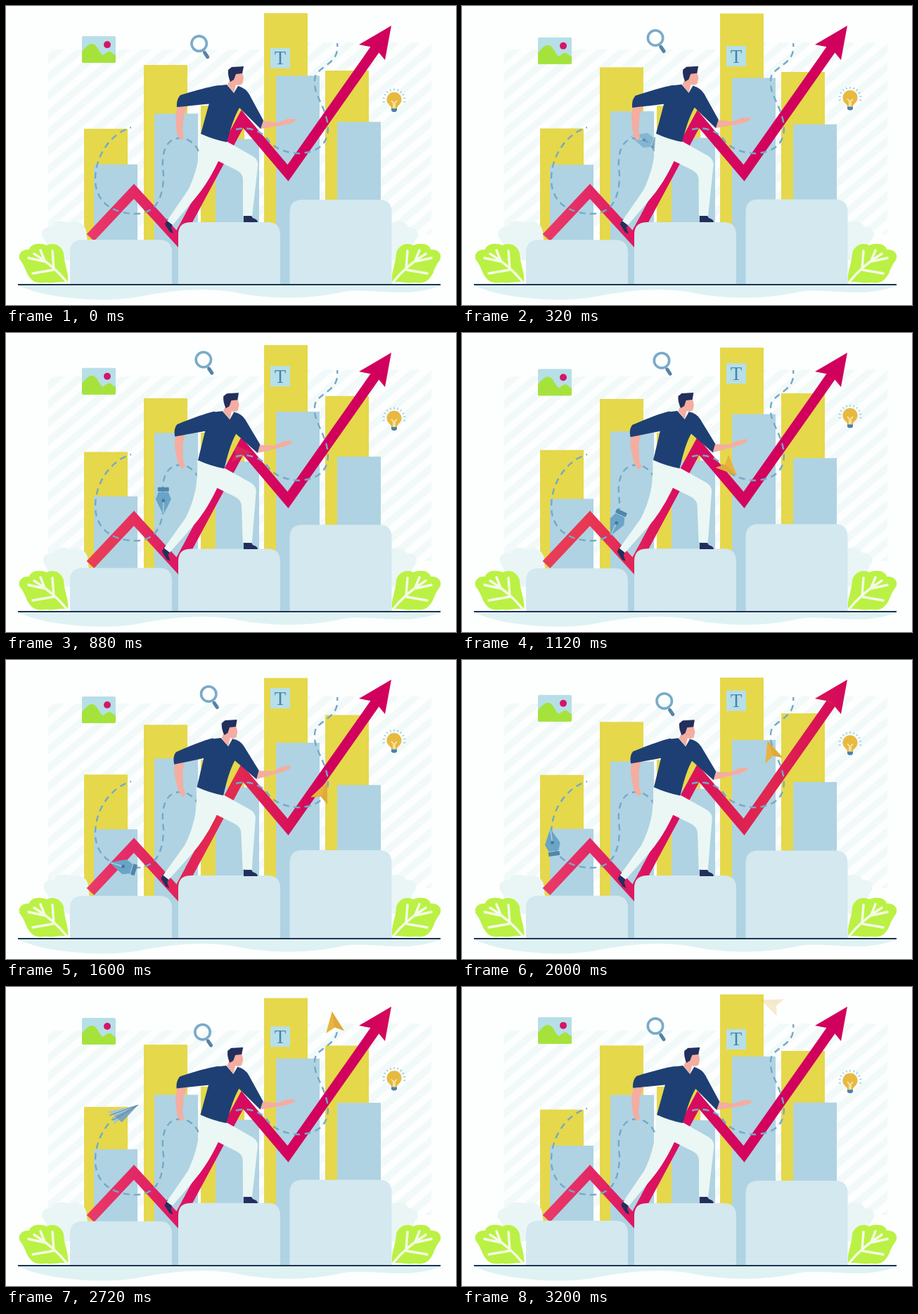
An HTML page for the animation above (3.28 s loop, 640x426 px).

```html
<!DOCTYPE html>
<html lang="en">
<head>
<meta charset="utf-8">
<title>Growth</title>
<style>
html, body { margin: 0; width: 100%; height: 100%; overflow: hidden; background: #fdfefe; }
svg { display: block; width: 640px; height: 426px; }
.dash { fill: none; stroke: #74a9c8; stroke-width: 2.4; stroke-dasharray: 9 6.5; }
.line { fill: none; }
.yellow { fill: #e5d84b; }
.blue { fill: #afd3e2; }
.podium { fill: #d3e8ef; }
.navy { fill: #1e3f73; }
.dark { fill: #222f5d; }
.skin { fill: #f4ada0; }
.cloth { fill: #ebf7f4; }
</style>
</head>
<body>
<svg viewBox="0 0 640 426">
  <defs>
    <linearGradient id="red" gradientUnits="userSpaceOnUse" x1="118" y1="0" x2="450" y2="0">
      <stop offset="0" stop-color="#e93b68"/>
      <stop offset=".45" stop-color="#dc1161"/>
      <stop offset="1" stop-color="#d1005d"/>
    </linearGradient>
    <linearGradient id="glow" gradientUnits="userSpaceOnUse" x1="-140" y1="0" x2="140" y2="0">
      <stop offset="0" stop-color="#ea4244" stop-opacity="0"/>
      <stop offset=".5" stop-color="#ea4244" stop-opacity=".6"/>
      <stop offset="1" stop-color="#ea4244" stop-opacity="0"/>
    </linearGradient>
    <clipPath id="area"><path d="M60 62H370V52H605V325H60Z"/></clipPath>
    <path id="blade" d="M88 395C90 380 83 370 82 352C79 340 66 336 58 341C46 336 34 340 33 347C22 346 16 354 20 362C26 370 27 374 30 381C36 392 42 396 56 394C70 396 80 390 88 395Z"/>
    <g id="plant">
      <use class="sway" href="#blade" fill="#eaf6f5" x="32" y="-32"/>
      <use href="#blade" fill="#bbf145"/>
      <path class="line" stroke="#f4fbe6" stroke-width="3.4" stroke-linecap="round" d="M87 394Q68 370 40 353M55 364L32 359M67 376L38 381M55 363L49 348M68 375L66 349"/>
    </g>
    <g id="trend">
      <path class="line" stroke-width="14.5" stroke-miterlimit="6" d="M120 330L182 264L244 332L336 161L401 238L526 60"/>
      <path stroke="none" d="M548 28L502 55L518 58L530 66L539 77Z"/>
    </g>
  </defs>

  <g id="stripes" clip-path="url(#area)" stroke="#f2f9f9" stroke-width="10"></g>
  <path fill="#dff2f3" d="M19 398C45 414 130 424 185 415C230 405 280 401 320 407C380 420 440 417 480 407C520 401 570 418 618 398Z"/>
  <g id="bars"></g>
  <use href="#plant"/>
  <use href="#plant" transform="translate(637) scale(-1 1)"/>
  <use href="#trend" fill="url(#red)" stroke="url(#red)"/>
  <use href="#trend" fill="url(#glow)" stroke="url(#glow)"/>
  <path class="dash" d="M274 207C270 198 260 188 248 188C230 188 219 205 224 240C224 272 214 296 185 296C150 296 127 278 127 247C127 212 150 181 178 173"/>
  <path class="dash" d="M327 176C345 171 363 178 372 190C380 203 400 210 418 210C445 208 462 195 457 165C452 138 434 122 440 100C447 84 475 82 471 53"/>
  <path id="leftWay" class="line" d="M274 207C270 198 260 188 248 188C230 188 219 205 224 240C224 272 214 296 185 296C150 296 127 278 127 247C127 212 150 181 178 173L220 153"/>
  <path id="rightWay" class="line" d="M327 176C345 171 363 178 372 190C380 203 400 210 418 210C445 208 462 195 457 165C452 138 434 122 440 100C447 84 475 82 471 53C471 40 464 29 452 24L432 17"/>

  <g id="flyer">
    <g id="nib">
      <rect x="-19" y="-8" width="6" height="16" rx="1" fill="#4f86ab"/>
      <path fill="#6aa4c6" d="M-12 -7L-2 -11Q9 -6 20 0Q9 6 -2 11L-12 7Z"/>
      <path class="line" stroke="#b9dae8" stroke-width="1.2" d="M2 0H18"/>
      <circle r="2.4" fill="#4479a2"/>
    </g>
    <g id="plane">
      <path fill="#a9c4d2" d="M23 0L-20 -9L-14 0L-20 11Z"/>
      <path fill="#7ba6bd" d="M23 0L-14 1L-8 13Z"/>
      <path class="line" stroke="#5488a6" d="M23 0L-20 -3M23 0L-17 5"/>
    </g>
  </g>
  <g id="cursor">
    <path fill="#e7b43f" d="M19 -4L-10 -18L-4 -4L-11 8Z"/>
    <path fill="#dfa93b" d="M19 -4L-4 -4L-11 8Z"/>
  </g>

  <g id="podiums" class="podium"></g>
  <path stroke="#1f3352" stroke-width="2" d="M17 397H618"/>

  <g id="man">
    <g id="backArm">
      <path class="skin" d="M244 141L258 142L253 156L251 178L253 188L248 191L243 182L241 158Z"/>
      <path class="navy" d="M304 113Q290 114 248 127Q242 133 243 144Q264 142 294 139Z"/>
    </g>
    <g id="backLeg">
      <path class="dark" d="M230 303L238 308L235 316L238 324L233 322L226 311Z"/>
      <path class="cloth" d="M276 186L311 200L302 221Q287 253 269 274L237 312L229 306L259 262Q270 240 274 215Z"/>
    </g>
    <path class="cloth" d="M276 182L314 193L351 214Q360 220 358 229L355 256L350 300L337 299L337 247Q337 239 328 234L302 221L276 205Z"/>
    <path class="navy" d="M297 114L314 112L324 124L330 114Q341 118 347 128L332 145Q323 160 314 194Q294 190 277 182L288 142Z"/>
    <g id="frontArm">
      <path class="skin" d="M361 163L386 166L400 161L411 161L411 165L399 169L362 175Z"/>
      <path class="navy" d="M330 114Q341 117 346 126L366 163L362 175L331 144Z"/>
    </g>
    <path class="skin" d="M318 106L325 95L336 94L338 103L336 111Q332 114 327 112L324 124L315 112Z"/>
    <path class="dark" d="M316 91L321 87L338 86L336 96L327 97L324 105L319 108Q315 99 316 91Z"/>
  </g>
  <path class="dark" d="M338 299H349L351 302Q358 304 358 308H338Z"/>

  <g id="picture">
    <rect x="108" y="43" width="48" height="38" rx="2" fill="#b7dfe8"/>
    <path fill="#a5e33c" d="M108 65C112 60 117 54 122 54C130 54 133 68 138 70C142 67 147 62 151 67Q154 70 156 70V79Q156 81 154 81H110Q108 81 108 79Z"/>
    <circle cx="144" cy="55" r="5" fill="#d31768"/>
  </g>
  <g id="lens">
    <path stroke="#79abc9" stroke-width="3" d="M5 9L9 14"/>
    <path stroke="#5683a6" stroke-width="5" stroke-linecap="round" d="M8 13L12 19"/>
    <circle r="10.7" class="line" stroke="#79abc9" stroke-width="3.6"/>
  </g>
  <g id="letter">
    <rect x="376" y="60" width="28" height="29" fill="#b7dfe9"/>
    <text x="390" y="83.5" text-anchor="middle" font-family="'Liberation Serif', serif" font-size="27" fill="#4583aa">T</text>
  </g>
  <g id="bulb">
    <path fill="#e8b93f" d="M548 146Q548 143 545 141A10.5 10.5 0 1 1 559 141Q556 143 556 146Z"/>
    <path class="line" stroke="#fff3cf" stroke-width="1.3" d="M551 146V138L548 135M553 146V138L556 135"/>
    <path fill="#4a83a8" d="M548 146H556V149L554 151H550L548 149Z"/>
    <g id="rays" stroke="#8fc6da" stroke-width="1.3"></g>
  </g>
</svg>
<script>
const LOOP = 3280, STEP = 80;
const $ = id => document.getElementById(id);
const set = (el, attrs) => { for (const k in attrs) el.setAttribute(k, attrs[k]); return el; };
const add = (parent, tag, attrs) =>
  parent.appendChild(set(document.createElementNS('http://www.w3.org/2000/svg', tag), attrs));
const ramp = (t, a, b) => Math.max(0, Math.min(1, (t - a) / (b - a)));

// One swing per loop around mid, highest value at time peak.
const swing = (t, mid, amp, peak) => mid + amp * Math.cos((t - peak) / LOOP * 2 * Math.PI);

const bar = (kind, x, ...top) => ({ top, el: add($('bars'), 'rect', { x, width: 62, class: kind }) });
const bars = [
  bar('yellow', 111, 169, 6, 100),   bar('blue', 125, 233.5, 8, 1750),
  bar('yellow', 196, 88, 6, 1200),   bar('blue', 211, 147, 7.5, 2990),
  bar('yellow', 277, 142, 0, 0),     bar('blue', 298, 185.5, 4.5, 3050),
  bar('yellow', 367, 18, 8, 1750),   bar('blue', 384, 108.5, 9.5, 1500),
  bar('yellow', 454, 85, 9, 350),    bar('blue', 471, 171.5, 7.5, 1350)
];

const podium = (x, ...top) => ({ x, top, el: add($('podiums'), 'path', {}) });
const podiums = [podium(91, 334.5, 1.5, 1650), podium(245, 307.5, .5, 0), podium(403.5, 273.5, 2.5, 0)];

for (let x = -240; x < 640; x += 31)
  add($('stripes'), 'path', { d: `M${x} 330L${x + 330} 50` });
for (let deg = -190; deg <= 10; deg += 20)
  add($('rays'), 'path', { d: 'M13.5 0H16.5', transform: `translate(552 134) rotate(${deg})` });

// Places el at distance s along the path, nose turned towards the way ahead.
function follow(el, path, s, opacity) {
  const at = d => path.getPointAtLength(Math.max(0, s + d));
  const p = at(0), a = at(-4), b = at(14);
  const deg = Math.atan2(b.y - a.y, b.x - a.x) * 180 / Math.PI;
  set(el, { transform: `translate(${p.x} ${p.y}) rotate(${deg})`, opacity });
}

function draw(t) {
  for (const { el, top } of bars) {
    const y = swing(t, ...top);
    set(el, { y, height: 396 - y });
  }
  for (const { el, x, top } of podiums)
    set(el, { d: `M${x} 396V${swing(t, ...top) + 18}q0 -18 18 -18h109q18 0 18 18V396Z` });

  const move = (id, x, y) => set($(id), { transform: `translate(${x} ${y})` });
  move('picture', 0, swing(t, 4.5, 4.7, 1450));
  move('letter', 0, swing(t, -10, 10, 3190));
  move('bulb', 0, swing(t, -9.3, 9.5, 3190));
  move('lens', swing(t, 281.5, 7, 1750), swing(t, 51.5, 13.5, 2540));

  // The man leans back with his front foot planted.
  const lean = swing(t, .5, .54, 1450);
  set($('man'), { transform: `translate(0 ${308 - lean}) skewX(${2.4 * lean}) translate(0 -308)` });
  set($('backArm'), { transform: `rotate(${-6 * lean} 298 118)` });
  set($('frontArm'), { transform: `translate(0 120) translate(322) skewY(${-6 * lean}) translate(-322 -120)` });
  set($('backLeg'), { transform: `translate(0 ${5 * lean}) rotate(${3 * lean} 290 200)` });
  for (const el of document.querySelectorAll('.sway')) set(el, { transform: `rotate(${3 * lean} 100 380)` });

  set($('glow'), { gradientTransform: `translate(${170 + (t - 1120) * .3})` });

  follow($('flyer'), $('leftWay'), 55 + .135 * (t - 560), ramp(t, 200, 400) * (1 - ramp(t, 2760, 3120)));
  const swap = ramp(t, 2440, 2680);
  set($('nib'), { opacity: 1 - swap });
  set($('plane'), { opacity: swap });

  const u = t - 1120;
  follow($('cursor'), $('rightWay'), 54 + u * (.2 - .000029 * u),
    ramp(t, 850, 1040) * (1 - .75 * ramp(t, 2800, 3200)));
}

const start = performance.now();
function tick() {
  const t = Math.max(0, performance.now() - start) % LOOP;
  draw(Math.floor(t / STEP) * STEP);
  requestAnimationFrame(tick);
}
tick();
</script>
</body>
</html>
```
